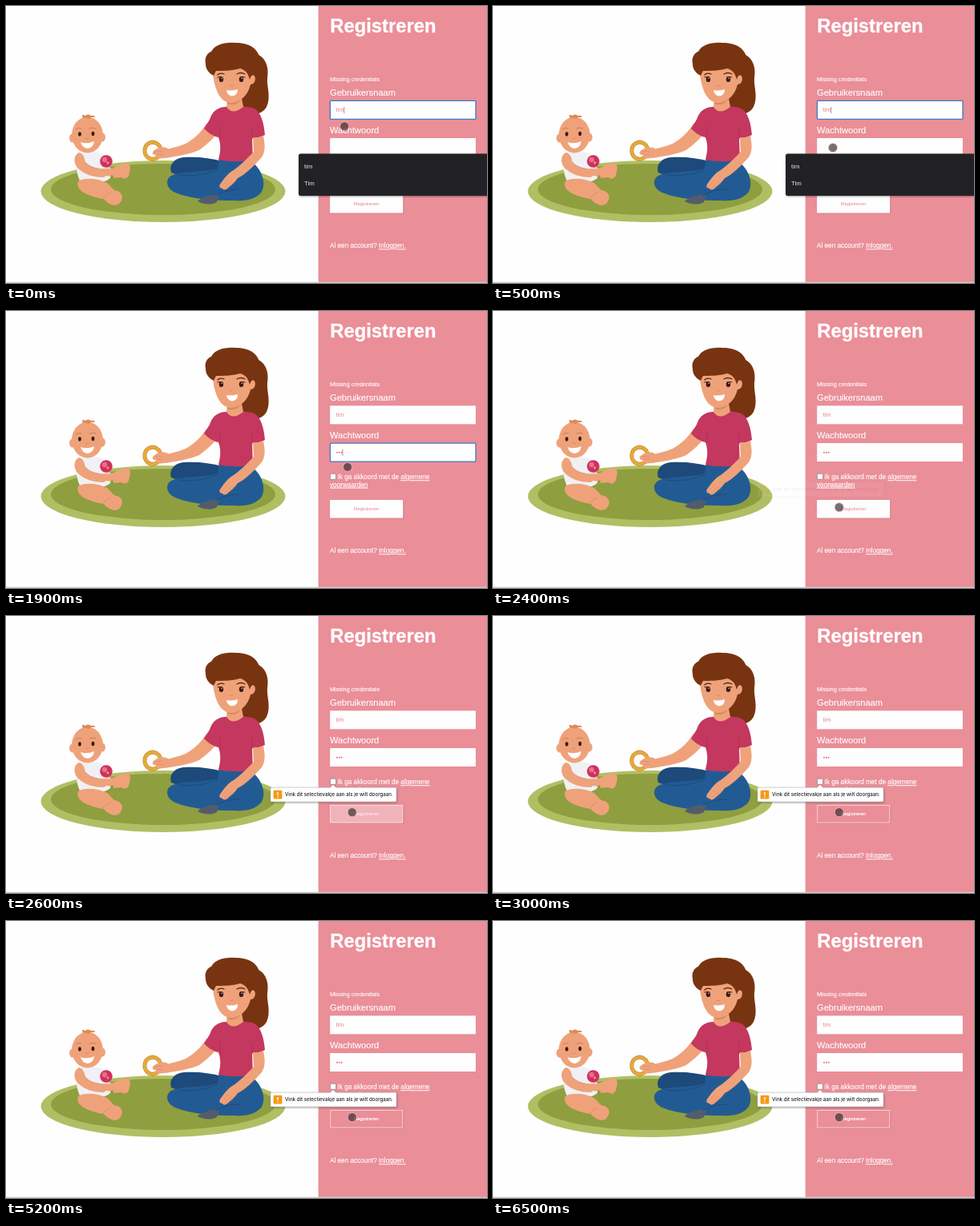
Recreate the animation shown at these times as an HTML page with a canvas. Size 600 px wide and 346 px high, loop 6600 ms.

```html
<!DOCTYPE html>
<html lang="nl">
<head>
<meta charset="utf-8">
<title>Registreren</title>
<style>
  html, body { margin: 0; width: 100%; height: 100%; overflow: hidden; background: #fefefe; }
  canvas, svg { position: absolute; left: 0; top: 0; width: 600px; height: 346px; display: block; }
  text { font-family: "Liberation Sans", Arial, sans-serif; fill: #fff; stroke: #fff; stroke-width: .14; white-space: pre; }
  .h1 { font-size: 23.8px; font-weight: 700; stroke-width: .3; }
  .label { font-size: 11.1px; }
  .body { font-size: 8.2px; }
  .small { font-size: 7.3px; }
  .link { text-decoration: underline; }
  .pink { fill: #e8848f; stroke: none; }
  .menu { font-size: 7.8px; fill: #e8eaed; stroke: none; }
  .tip { font-family: Inter, "Liberation Sans", sans-serif; font-size: 6.17px; font-weight: 500; fill: #222; stroke: none; }
  .ring { fill: none; stroke: #3f7cc4; stroke-width: 1.3; }
  .caret { stroke: #a8525d; stroke-width: .7; }
</style>
</head>
<body>
<canvas id="art" width="600" height="346"></canvas>
<svg viewBox="0 0 600 346">
  <defs>
    <filter id="shade" x="-10%" y="-40%" width="120%" height="190%">
      <feDropShadow dx="0.6" dy="1" stdDeviation="1.1" flood-color="#000" flood-opacity=".4"/>
    </filter>
  </defs>
  <rect x="389.6" width="210.4" height="345" fill="#ea8e98"/>
  <rect y="344.7" width="600" height="1.3" fill="#cfcbcd"/>
  <text class="h1" x="404.3" y="33">Registreren</text>
  <text class="small" x="404" y="93.5">Missing credentials</text>
  <text class="label" x="404" y="112">Gebruikersnaam</text>
  <rect x="404.2" y="118.3" width="181.7" height="23" fill="#fefefe"/>
  <text class="small pink" x="411.5" y="132.3">tim</text>
  <g id="nameFocus">
    <rect class="ring" x="404.4" y="118.4" width="181.6" height="23" rx="1"/>
    <path class="caret" d="M421.8 126v8"/>
  </g>
  <text class="label" x="404" y="159">Wachtwoord</text>
  <rect x="404.2" y="165" width="181.7" height="23" fill="#fefefe"/>
  <g id="dots" fill="#d97580">
    <circle cx="413" cy="176.700" r="1"/>
    <circle cx="415.800" cy="176.700" r="1"/>
    <circle cx="418.600" cy="176.700" r="1"/>
  </g>
  <g id="passFocus">
    <rect class="ring" x="404.4" y="165.2" width="181.6" height="23" rx="1"/>
    <path id="passCaret" class="caret" d="M411.500 172.700v8"/>
  </g>
  <rect x="404.5" y="203.3" width="7" height="7" rx="1" fill="#fff" stroke="#777" stroke-width=".6"/>
  <text class="body" x="413.6" y="210.3">Ik ga akkoord met de <tspan class="link">algemene</tspan></text>
  <text class="body link" x="404" y="219.7">voorwaarden</text>
  <path d="M405.500 258.800H496V237.500" fill="none" stroke="#d0808a" stroke-opacity=".6" stroke-width="1.500"/>
  <rect x="404.700" y="236.500" width="90" height="21.500" fill="#ea8e98" stroke="#f7d5d9" stroke-width=".9"/>
  <text x="433.8" y="249.4" font-size="6.1">Registreren</text>
  <g id="button">
    <rect x="404.200" y="236" width="90.800" height="22.300" fill="#fefefe"/>
    <text class="pink" x="433.8" y="249.4" font-size="6.1">Registreren</text>
  </g>
  <text class="body" x="404" y="302.4">Al een account? <tspan class="link">Inloggen.</tspan></text>
  <g id="tip">
    <path d="M331 214.200H404.500L408 210.700L411.500 214.200H486Q487 214.200 487 215.200V231Q487 232 486 232H331Q330 232 330 231V215.200Q330 214.200 331 214.200Z"
      fill="#fff" stroke="#aaa" stroke-width=".5" filter="url(#shade)"/>
    <rect x="333.600" y="217.800" width="10.800" height="10.800" rx="1" fill="#f59a12"/>
    <path d="M339 219.900v4.300M339 225.500v1.300" stroke="#fff" stroke-width="1.400"/>
    <text class="tip" x="348" y="225.400">Vink dit selectievakje aan als je wilt doorgaan.</text>
  </g>
  <g id="menu">
    <rect x="365" y="184.500" width="240" height="52.500" rx="2.500" fill="#202325" filter="url(#shade)"/>
    <text class="menu" x="372" y="202.600">tim</text>
    <text class="menu" x="372" y="224">Tim</text>
  </g>
  <circle id="pointer" r="5.600" fill="#3a2b2d" fill-opacity=".68" stroke="#f0d3d6" stroke-opacity=".7" stroke-width="1"/>
</svg>
<script>
const $ = id => document.getElementById(id);
const ctx = $('art').getContext('2d');
ctx.lineCap = ctx.lineJoin = 'round';

const SKIN = '#efa27a', FOLD = '#d98a63', HAIR = '#783410', SHIRT = '#c4375f';
const JEANS = '#225b94', DARK = '#1d4a7b', DRESS = '#f1f0f4', BROWN = '#3b1a13';

function fill(color, d) {
  ctx.fillStyle = color;
  ctx.fill(new Path2D(d));
}
function line(color, width, d) {
  ctx.strokeStyle = color;
  ctx.lineWidth = width;
  ctx.stroke(new Path2D(d));
}
function oval(color, x, y, rx, ry = rx, turn = 0) {
  ctx.fillStyle = color;
  ctx.beginPath();
  ctx.ellipse(x, y, rx, ry, turn, 0, Math.PI * 2);
  ctx.fill();
}

function drawRug() {
  oval('#b0bf63', 196, 231.5, 152.5, 38.5);
  oval('#8f9e3f', 196, 229, 140, 32);
}

function drawBaby() {
  // far arm and leg
  line(SKIN, 9, 'M122 206L142 208');
  fill(SKIN, 'M134 202C139 199 146 198 150 196C155 196 156 202 154 208C153 216 148 217 144 214L134 215Z');
  // dress and near leg
  fill(DRESS, 'M90 184C98 181 113 181 121 185C128 194 132 206 130 215C122 222 104 223 92 218C87 207 86 194 90 184Z');
  fill(SKIN, 'M90 219C97 214 115 215 126 221C132 226 134 231 139 231C146 234 147 241 141 247C136 251 128 248 122 241C110 239 97 235 92 229Q88 224 90 219Z');
  line(FOLD, .8, 'M121 240Q125 235 130 233');
  // near arm
  fill(SKIN, 'M91 183C84 186 84 196 89 202C98 211 110 214 122 214C128 211 129 205 125 203C114 204 104 201 99 195C98 189 96 184 91 183Z');
  line(FOLD, .7, 'M99 195Q105 202 115 203');
  // rattle
  line('#e7c1cd', 2, 'M125 198L129 207');
  oval('#cf325b', 125, 194, 7.8);
  oval('#e96f8a', 123, 192, 3.2);
  oval('#f19bad', 127, 196, 1.4);
  oval(SKIN, 128, 208, 5, 4.5);
  // head
  oval(SKIN, 83, 165, 4, 5.5);
  oval(SKIN, 120, 164, 4, 5.5);
  oval(SKIN, 101.5, 161, 19.5, 22.5);
  fill('#dd8a55', 'M96 140Q93 134 99 137Q102 134 106 137Q111 136 111 139Q106 138 103 141Q99 139 96 140Z');
  line('#c97a50', .9, 'M87 154Q90 151 94 153M104 153Q108 151 112 153');
  oval(BROWN, 92, 160, 1.9, 2.8);
  oval(BROWN, 108.5, 159.5, 1.9, 2.8);
  line(FOLD, .9, 'M99 165Q101 167 103 165');
  fill('#fff', 'M93 170Q101 173 110 169Q109 177 102 178Q95 177 93 170Z');
}

function drawWoman() {
  // ponytail
  fill(HAIR, 'M300 58L315 61C325 66 328 78 326 90C325 101 331 113 325 126C321 134 309 138 298 134C291 130 292 121 293 112Z');
  // legs
  fill(DARK, 'M206 208C203 198 210 190 222 189C240 188 255 190 270 194L267 216L222 214Z');
  fill(JEANS, 'M266 190C282 188 300 189 307 195C319 204 325 221 319 232C312 241 301 244 285 243C262 243 232 242 211 233C200 228 198 217 206 212C218 206 248 208 264 203Z');
  fill('#535d6a', 'M239 244C244 239 255 235 266 236L263 245C256 249 246 248 239 244Z');
  line(DARK, 1, 'M216 211C232 213 250 211 264 204M262 237C270 231 282 229 292 229');
  // forearm with ring
  fill(SKIN, 'M250 147C244 157 235 166 224 172C214 176 204 178 196 180L198 190C212 188 230 185 241 180C251 173 259 165 264 158Z');
  line('#c98a2b', 5, 'M193 181A10 10.500 0 1 1 193 180.500');
  line('#e4a93f', 3.800, 'M193 181A10 10.500 0 1 1 193 180.500');
  fill(SKIN, 'M202 178C196 175 188 177 184 181C181 184 184 187 188 186C186 190 192 192 200 189Z');
  line(FOLD, .7, 'M186 182Q191 180 195 182M187 186Q192 184 196 186');
  // shirt
  fill(SHIRT, 'M273 126C262 127 257 133 254 142L247 153Q255 162 265 164C269 175 267 184 265 192C278 195 296 195 308 192L307 165Q316 165 323 161C322 147 318 130 307 127L294 125Z');
  line('#b02d54', .7, 'M267 151Q267 160 267 165M307 152L307 166');
  // neck
  fill(SKIN, 'M276 115L275 126Q282 137 296 126L293 110Z');
  fill(FOLD, 'M276 118Q285 123 293 113L293 117Q286 126 276 122Z');
  // resting arm
  fill(SKIN, 'M308 164Q316 165 321 162C323 173 324 181 319 189C309 200 299 210 289 215C286 220 281 224 276 228Q272 231 270 228L267 227Q265 224 269 220C273 214 278 208 284 205C294 198 303 188 309 182Z');
  line(FOLD, .7, 'M268 226L277 217M272 228L281 219M276 228L284 220');
  // face
  fill(SKIN, 'M258 80C258 90 260 98 263 106C267 116 274 121 281 121C293 120 302 111 305 98C312 98 313 86 307 86L304 74L262 72Z');
  fill(HAIR, 'M249 72C247 64 252 58 256 57C261 48 272 45 286 46C304 46 313 53 316 63C319 74 317 84 311 87Q306 84 304 92C302 84 299 80 292 78C282 81 270 81 262 81L259 87C253 84 249 79 249 72Z');
  line('#5b250c', 1.300, 'M264 86Q267 83 272 85M288 85Q293 82 298 85');
  oval(BROWN, 268.500, 91.500, 2.700, 3.600);
  oval(BROWN, 293.500, 91.500, 2.700, 3.600);
  oval('#fff', 269.200, 90.300, .7);
  oval('#fff', 294.200, 90.300, .7);
  line(BROWN, 1, 'M264 89L267 88.500M295 88.500L298 89');
  line(FOLD, 1, 'M279 99Q281 101 283 99');
  fill('#fff', 'M275 105Q282 106.500 289 104Q289 112 282 112.500Q276 112 275 105Z');
}

drawRug();
drawBaby();
drawWoman();

const LOOP = 6600;
const FOCUS = 650, TYPE = 1100, WAKE = 1750, SUBMIT = 2200, ALERT = 2400;
const ramp = (t, a, b) => Math.min(1, Math.max(0, (t - a) / (b - a)));
const ease = p => p * p * (3 - 2 * p);
const mix = (a, b, p) => a + (b - a) * p;
const show = (id, amount) => $(id).setAttribute('opacity', +amount);

function render(t) {
  show('menu', t < FOCUS);
  show('nameFocus', t < FOCUS);
  show('passFocus', t >= FOCUS && t < SUBMIT);

  const typed = (t >= TYPE) + (t >= 1400) + (t >= 1600);
  [...$('dots').children].forEach((dot, i) => dot.setAttribute('opacity', +(i < typed)));
  $('passCaret').setAttribute('transform', `translate(${typed * 2.8})`);

  // the pointer hides while typing and returns once it moves
  const down = ease(ramp(t, 0, 500));
  const toButton = ease(ramp(t, WAKE, SUBMIT));
  $('pointer').setAttribute('cx', mix(mix(422.2, 424, down), 431.8, toButton));
  $('pointer').setAttribute('cy', mix(mix(150.3, 177, down), 245.2, toButton));
  show('pointer', t < TYPE || t >= WAKE);

  show('button', 1 - ramp(t, ALERT, ALERT + 300));
  show('tip', ramp(t, ALERT - 10, ALERT + 190));
}

const start = performance.now();
function tick() {
  render((performance.now() - start) % LOOP);
  requestAnimationFrame(tick);
}
tick();
</script>
</body>
</html>
```
